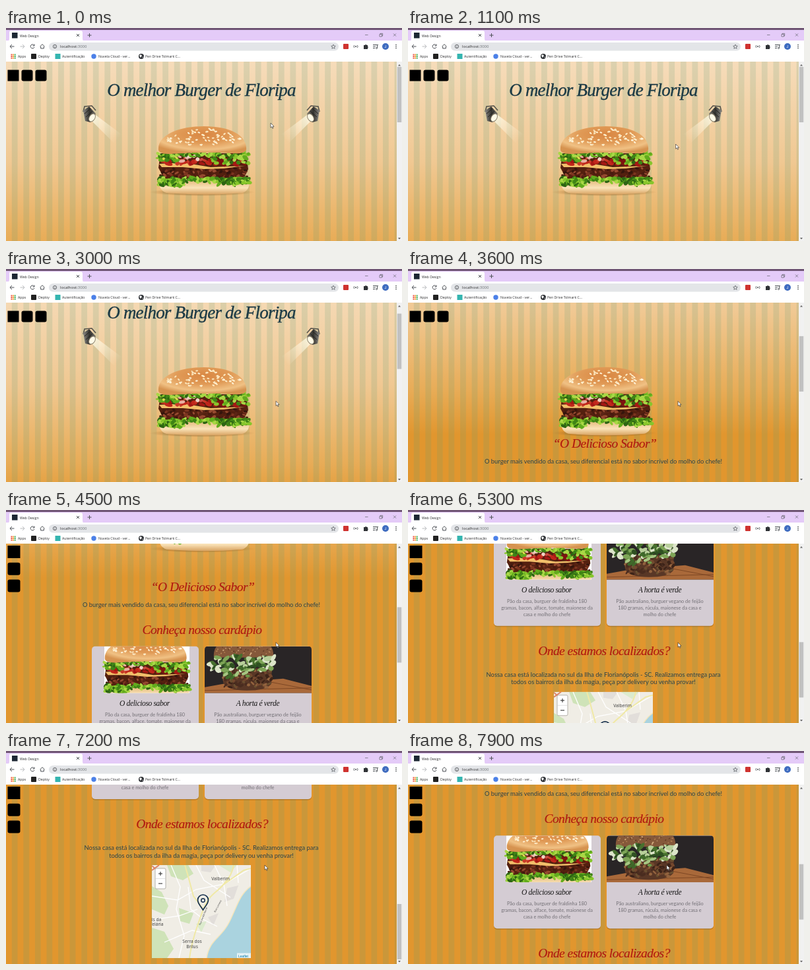
An HTML page for the animation above (8 s loop, 600 by 323 pixels).

```html
<!DOCTYPE html>
<html lang="pt-BR">
<head>
<meta charset="utf-8">
<title>Web Design</title>
<style>
html, body { margin: 0; width: 100%; height: 100%; overflow: hidden; background: #fff; }
svg { display: block; width: 100vw; height: 100vh; }
.ui { font: 5.2px "Open Sans", sans-serif; fill: #2c2c2e; }
.script { font-family: "Liberation Serif", serif; font-style: italic; letter-spacing: -.03em; text-anchor: middle; }
.title { font-size: 27px; fill: #1c3a45; stroke: #1c3a45; stroke-width: .35; }
.head { font-size: 19.6px; fill: #b01a12; stroke: #b01a12; stroke-width: .15; }
.name { font-size: 11.5px; fill: #161616; }
.copy { font: 9.4px Lato, sans-serif; fill: #29424a; text-anchor: middle; }
.desc { font: 7.35px Lato, sans-serif; fill: #737076; text-anchor: middle; }
.place { font: 6.6px "Noto Sans", sans-serif; fill: #444; text-anchor: middle; }
.line { fill: none; stroke: #4d5156; stroke-width: 1; }
</style>
</head>
<body>
<svg viewBox="0 0 600 323" preserveAspectRatio="none">
<defs>
  <clipPath id="view"><rect y="51" width="592" height="272"/></clipPath>
  <clipPath id="cardL"><path d="M130 565V499q0-5 5-5H287q5 0 5 5V565Z"/></clipPath>
  <clipPath id="cardR"><path d="M301 565V499q0-5 5-5H458q5 0 5 5V565Z"/></clipPath>
  <clipPath id="mapClip"><rect x="221" y="173" width="150" height="141"/></clipPath>
  <linearGradient id="sky" gradientUnits="userSpaceOnUse" x1="0" y1="51" x2="0" y2="390">
    <stop stop-color="#f6dcba"/><stop offset="1" stop-color="#e1962e"/>
    <stop offset="0" stop-color="#f6dcba"/>
  </linearGradient>
  <linearGradient id="dusk" gradientUnits="userSpaceOnUse" x1="0" y1="51" x2="0" y2="390">
    <stop stop-color="#f6dcba"/><stop offset=".45" stop-color="#f0c892"/><stop offset=".8" stop-color="#e8ac57"/><stop offset="1" stop-color="#e1962e"/>
  </linearGradient>
  <pattern id="stripes" width="17.57" height="10" patternUnits="userSpaceOnUse">
    <rect x="8.785" width="8.785" height="10" fill="#5a9678" opacity=".17"/>
  </pattern>
  <radialGradient id="bun" cx=".52" cy=".3" r=".68">
    <stop stop-color="#d98743"/><stop offset=".45" stop-color="#e09a56"/><stop offset=".8" stop-color="#f0c184"/><stop offset="1" stop-color="#d69350"/>
  </radialGradient>
  <linearGradient id="base" x2="0" y2="1">
    <stop stop-color="#e2b678"/><stop offset=".55" stop-color="#fae3b8"/><stop offset="1" stop-color="#d8a260"/>
  </linearGradient>
  <radialGradient id="shade">
    <stop stop-color="#5b3a14" stop-opacity=".65"/><stop offset=".7" stop-color="#8a5c26" stop-opacity=".35"/><stop offset="1" stop-color="#b07a38" stop-opacity="0"/>
  </radialGradient>
  <linearGradient id="beam" gradientUnits="userSpaceOnUse" x1="131" y1="136" x2="170" y2="168">
    <stop stop-color="#fffbe6" stop-opacity=".85"/><stop offset="1" stop-color="#fff4da" stop-opacity="0"/>
  </linearGradient>
  <linearGradient id="metal"><stop stop-color="#8a8884"/><stop offset=".5" stop-color="#33332f"/><stop offset="1" stop-color="#77746c"/></linearGradient>
  <g id="lamp">
    <path d="M129 140 136 132 176 162 164 175Z" fill="url(#beam)"/>
    <path d="M117 127 119 119 130 118 136 125" fill="none" stroke="#55534c" stroke-width="1.600"/>
    <path d="M117 125 126 119 136 130 128 143 120 141Z" fill="url(#metal)"/>
    <path d="M119 130 127 123M121 135 131 126" stroke="#24231f"/>
    <ellipse cx="130.500" cy="136" rx="4.200" ry="6.500" transform="rotate(32 130.500 136)" fill="#fffbe8" stroke="#8d8470"/>
  </g>
  <g id="burger"></g>
</defs>

<g clip-path="url(#view)">
  <g id="page">
    <rect y="51" width="592" height="840" fill="url(#dusk)"/>
    <rect y="51" width="592" height="840" fill="url(#stripes)"/>
    <text class="script title" x="296" y="103">O melhor Burger de Floripa</text>
    <use href="#lamp"/><use href="#lamp" transform="matrix(-1 0 0 1 592 0)"/>
  </g>
  <use id="hero" href="#burger"/>
  <g id="content">
    <text class="script head" x="298" y="410">“O Delicioso Sabor”</text>
    <text class="copy" x="296" y="434">O burger mais vendido da casa, seu diferencial está no sabor incrível do molho do chefe!</text>
    <text class="script head" x="297" y="475">Conheça nosso cardápio</text>
    <g fill="#7a4a10" opacity=".35"><rect x="130" y="495.500" width="162" height="141" rx="5"/><rect x="301" y="495.500" width="162" height="141" rx="5"/></g>
    <g fill="#d4ccd3"><rect x="130" y="494" width="162" height="141" rx="5"/><rect x="301" y="494" width="162" height="141" rx="5"/></g>
    <g clip-path="url(#cardL)">
      <rect x="149" y="494" width="129" height="71" fill="#fff"/>
      <use href="#burger" transform="translate(-65 341.200) scale(.93)"/>
    </g>
    <g clip-path="url(#cardR)">
      <rect x="301" y="494" width="162" height="71" fill="#292526"/>
      <path d="M301 556 340 549 420 543 463 554V565H301Z" fill="#a9693a"/>
      <path d="M301 561 463 557M400 548 463 560" stroke="#7d4724"/>
      <g id="vegan"></g>
    </g>
    <text class="script name" x="210" y="584">O delicioso sabor</text>
    <text class="script name" x="381.500" y="584">A horta é verde</text>
    <g class="desc">
      <text x="210.500" y="600">Pão da casa, burguer de fraldinha 180</text>
      <text x="210.500" y="610">gramas, bacon, alface, tomate, maionese da</text>
      <text x="210.500" y="620">casa e molho do chefe</text>
      <text x="381.500" y="600">Pão australiano, burguer vegano de feijão</text>
      <text x="381.500" y="610">180 gramas, rúcula, maionese da casa e</text>
      <text x="381.500" y="620">molho do chefe</text>
    </g>
    <text class="script head" x="297" y="679">Onde estamos localizados?</text>
    <text class="copy" x="296" y="712">Nossa casa está localizada no sul da Ilha de Florianópolis - SC. Realizamos entrega para</text>
    <text class="copy" x="296" y="723.500">todos os bairros da ilha da magia, peça por delivery ou venha provar!</text>
    <g transform="translate(0 562)" clip-path="url(#mapClip)">
      <rect x="221" y="173" width="150" height="141" fill="#f0ede5"/>
      <g fill="#cfe3b8">
        <path d="M221 205 236 214 246 235 240 248 221 240ZM244 173H276L284 186 268 196 250 190ZM221 268 240 274 254 300 244 314H221ZM262 238 284 246 278 262 264 258Z"/>
        <path d="M322 173H350L340 184ZM288 262 304 258 296 275Z" fill="#dcebcd"/>
      </g>
      <path d="M296 173H318L310 184 296 182ZM335 208 352 204 345 224 331 229ZM306 252 322 246 314 265Z" fill="#e2deda"/>
      <path fill="none" stroke="#fff" stroke-width="1.300" d="M221 220 260 226 288 210 330 202 371 178M250 173 264 206 258 240 270 280 262 314M288 173 300 196 340 222M316 173 330 202 335 235M221 256 262 250 290 240M240 290 282 272 310 278M276 206 280 240 300 256 320 266M350 173 352 200"/>
      <path d="M371 205C354 217 350 236 338 260S308 286 304 314H371Z" fill="#aad3df"/>
      <path d="M371 205C354 217 350 236 338 260S308 286 304 314" fill="none" stroke="#f4e6bd" stroke-width="1.500"/>
      <path d="M278 314C282 285 291 262 299 240S318 216 329 203 343 184 345 173M299 240 284 220 276 190 271 173M329 203 360 181 371 178" fill="none" stroke="#f0e9a6" stroke-width="2"/>
      <path d="M221 181 232 173M221 174 229 181" stroke="#dc8468" stroke-width="2"/>
      <g class="place">
        <text x="325" y="196">Valberim</text><text x="282" y="291">Serra dos</text><text x="282" y="298.500">Brilus</text>
        <text x="228" y="258">is da</text><text x="228" y="265">Velária</text>
        <text font-size="3.600" transform="translate(300 251) rotate(-68)">Rua Verdal Norte</text>
        <text font-size="3.600" transform="translate(322 236) rotate(-62)">Rua Lumera</text>
      </g>
      <rect x="226" y="178" width="16" height="31" rx="2" fill="#fff" stroke="#b4b1aa"/>
      <path d="M226 193.500H242" stroke="#ccc" stroke-width=".6"/>
      <path d="M231 186H237M234 183V189M231 201H237" stroke="#222"/>
      <path d="M298.500 241C294 234 290.500 231 290.500 226A8 8 0 0 1 306.500 226C306.500 231 303 234 298.500 241Z" fill="none" stroke="#16304d" stroke-width="1.700"/>
      <circle cx="298.500" cy="226.500" r="2.700" fill="none" stroke="#16304d" stroke-width="1.500"/>
      <rect x="350" y="306.500" width="21" height="8" fill="#fff" opacity=".7"/>
      <text x="352" y="312.500" font-size="5" font-family="Liberation Sans, sans-serif" fill="#0078a8">Leaflet</text>
    </g>
  </g>
  <g id="icons"><rect/><rect/><rect/></g>
</g>

<rect width="600" height="20" fill="#e4cbf8"/>
<rect width="600" height="3" fill="#705675"/>
<path d="M2 20Q5 20 5 16V7Q5 4 8 4H113Q116 4 116 7V16Q116 20 119 20Z" fill="#fff"/>
<rect y="19" width="600" height="32" fill="#fff"/>
<rect x="9" y="7" width="8.500" height="8.500" fill="#1c2733"/>
<g class="ui">
  <text x="21" y="13.500">Web Design</text>
  <text x="18" y="45">Apps</text><text x="49" y="45">Deploy</text><text x="85" y="45">Autentificação</text>
  <text x="140" y="45">Nuvela Cloud - ver...</text><text x="211" y="45">Pen Drive Tolmark C...</text>
</g>
<path class="line" d="M107 9 111 13M111 9 107 13M123.500 11H129.500M126.500 8V14" stroke-width=".8"/>
<path class="line" d="M544 10.500H548.500M566 9.500H569.500V13H566ZM567 9.500V8.300H570.700V12H569.500M587 8.500 591 12.500M591 8.500 587 12.500" style="stroke-width:.6"/>
<rect x="65" y="22" width="439" height="12.500" rx="6.200" fill="#e3e5e8"/>
<g class="line">
  <path d="M12.500 28H6.500M9 25 6 28 9 31"/>
  <path d="M21.500 28H27.500M25 25 28 28 25 31" stroke="#b8babd"/>
  <path d="M42.500 26A3 3 0 1 0 43 29M43 24.500V27H40.500M51.500 28 55 24.700 58.500 28M52.700 28V31H57.300V28"/>
  <circle cx="74" cy="28" r="2.700" stroke-width=".8"/><path d="M74 27.500V30M74 26V26.600" stroke-width=".7"/>
  <path d="M496 25 497 27.200 499.300 27.400 497.500 28.900 498.100 31.200 496 30 493.900 31.200 494.500 28.900 492.700 27.400 495 27.200Z" stroke-width=".7"/>
  <path d="M527.700 26Q526 28 527.700 30M532.300 26Q534 28 532.300 30" stroke-width=".8"/><circle cx="530" cy="28" r=".8"/>
  <path d="M556 25.500H562M556 28H560M556 30.500H559M562.500 30.500V25.500H564"/><circle cx="561.500" cy="30.500" r="1"/>
</g>
<path d="M542 26H544A1.300 1.300 0 0 1 546.500 26H548V28A1.300 1.300 0 0 1 548 30.300V32H542Z" fill="#2f3236"/>
<rect x="511" y="24" width="8" height="8" rx="1" fill="#cf3330"/>
<circle cx="575" cy="28" r="5" fill="#3f6cc0"/>
<text x="575" y="29.800" text-anchor="middle" font-size="5" font-family="Roboto, sans-serif" fill="#fff">J</text>
<g fill="#2f3236"><circle cx="591" cy="25.500" r=".8"/><circle cx="591" cy="28" r=".8"/><circle cx="591" cy="30.500" r=".8"/></g>
<text class="ui" x="82" y="30.300" style="font-size:6px">localhost:<tspan fill="#707478">3000</tspan></text>
<g id="apps"></g>
<rect x="38" y="39" width="8" height="8" rx="1" fill="#222"/>
<rect x="74.500" y="39" width="8" height="8" fill="#35b5b0"/>
<circle cx="133" cy="43" r="3.700" fill="#4b80e8"/>
<circle cx="205" cy="43" r="4" fill="#2f3236"/><path d="M202 42 204 40 206 42 204 45ZM207 44 208.500 43 207 46Z" fill="#fff"/>
<rect x="592" y="51" width="8" height="272" fill="#f1f1f1"/>
<path d="M594 57.500 596 55 598 57.500ZM594 318 596 320.500 598 318Z" fill="#666"/>
<rect id="thumb" x="592.800" width="6.400" height="84" fill="#c1c1c1"/>
<path id="arrow" d="M0 0V7.200L1.700 5.700 2.900 8.300 4 7.800 2.900 5.300H5.100Z" fill="#fff" stroke="#222" stroke-width=".6"/>
<path id="hand" d="M0 0Q1-.8 1.600.2V3L4.700 3.700Q5.300 4 5.200 5L4.600 8H.8L-1.500 4.900Q-1.200 4 0 4.800Z" fill="#fff" stroke="#222" stroke-width=".6"/>
</svg>

<script>
const $ = id => document.getElementById(id);
let seed = 7;
const rand = () => (seed = seed * 16807 % 2147483647) / 2147483647;
const between = (a, b) => a + (b - a) * rand();
const pick = list => list[Math.floor(rand() * list.length)];
const dot = (x, y, rx, ry, fill, turn = 0) =>
  `<ellipse rx="${rx.toFixed(1)}" ry="${ry.toFixed(1)}" fill="${fill}" transform="translate(${x.toFixed(1)} ${y.toFixed(1)}) rotate(${turn.toFixed(0)})"/>`;

// Scatters small tilted ellipses over a rectangle.
function scatter(count, [x0, x1], [y0, y1], size, colors) {
  let out = '';
  for (let i = 0; i < count; i++) {
    const x = x0 + (x1 - x0) * (i + rand()) / count;
    out += dot(x, between(y0, y1), size * between(.7, 1.4), size * between(.4, .8), pick(colors), between(-60, 60));
  }
  return out;
}

function seeds() {
  let out = '';
  for (let i = 0; i < 75; i++) {
    const u = between(-.85, .85), top = 150 + 33 * (1 - Math.sqrt(1 - u * u));
    const y = between(top + 2, 178 - 8 * u * u);
    out += dot(300 + u * 65, y, 2, 1.1, pick(['#fff3d8', '#fae3b8', '#ffedc8']), between(-50, 50));
  }
  return out;
}

const greens = ['#3f8416', '#62ab1d', '#87c62c', '#a9d846', '#2d6413'];
const browns = ['#35150d', '#5c2516', '#7d3520', '#481b10', '#964a30'];

$('burger').innerHTML =
  dot(297, 249, 80, 6, 'url(#shade)') +
  '<path d="M232 230H369Q370 246 358 250Q300 255 243 250Q231 246 232 230Z" fill="url(#base)"/>' +
  '<path d="M234 190H364L367 214 360 229H240L231 212Z" fill="#54200f"/>' +
  scatter(100, [234, 365], [212, 228], 3, browns) +
  '<path d="M232 206 268 204 310 211 362 209 330 213 300 214 268 211 236 211Z" fill="#f2bf6a"/>' +
  scatter(30, [236, 362], [200, 207], 4.5, ['#a51814', '#c0261b', '#7e1310', '#c93a28']) +
  scatter(9, [262, 296], [194, 202], 3.8, ['#e8b0a2', '#c84c42', '#f0d3c6']) +
  scatter(50, [231, 369], [189, 195], 3.6, greens) +
  scatter(26, [312, 368], [193, 206], 4, greens) +
  scatter(16, [231, 260], [193, 202], 4, [...greens, '#d8dc4e']) +
  scatter(60, [231, 369], [227, 234], 4, greens) +
  scatter(40, [231, 270], [230, 239], 4, greens) +
  scatter(34, [322, 369], [229, 238], 4, greens) +
  '<path d="M231 185C229 164 258 149 300 149S366 164 364 185Q362 191 346 190Q300 187 250 191Q232 191 231 185Z" fill="url(#bun)"/>' +
  seeds();

$('vegan').innerHTML =
  '<path d="M315 511Q313 493 330 486H392Q407 494 405 511Z" fill="#85583a"/>' +
  scatter(45, [318, 402], [493, 507], 1.2, ['#d5ad80', '#b98858', '#5f3a24']) +
  '<path d="M328 527H403L402 551Q394 561 365 561 335 561 329 549Z" fill="#593726"/>' +
  scatter(100, [330, 402], [530, 556], 3, ['#3c2318', '#74482d', '#93633e', '#4a2c1f', '#6a5030']) +
  scatter(75, [309, 406], [509, 530], 5, ['#47702e', '#7ea557', '#b8cf9a', '#2f5122', '#dce5c9']) +
  scatter(14, [330, 372], [526, 541], 4, ['#6c9848', '#a6c682', '#3f692a']);

let grid = '';
for (let i = 0; i < 9; i++) {
  const color = ['#ea4335', '#f29b2d', '#34a853', '#4285f4'][(i + Math.floor(i / 3)) % 4];
  grid += `<rect x="${7.5 + i % 3 * 2.6}" y="${39.5 + Math.floor(i / 3) * 2.6}" width="1.9" height="1.9" fill="${color}"/>`;
}
$('apps').innerHTML = grid;

const LOOP = 8000, MAX_SCROLL = 562;
const scrollKeys = [[0, 0], [2850, 0], [3600, 139], [4500, 287], [5300, 459], [5800, 562], [7230, 562], [7900, 366], [8000, 345]];
const xKeys = [[0, 401], [300, 401], [1700, 409], [5800, 409], [6250, 302], [6700, 302], [7200, 392], [8000, 392]];
const yKeys = [[0, 144], [300, 144], [1700, 200], [5800, 201], [6250, 228], [6700, 228], [7200, 173], [8000, 173]];

function track(keys, t) {
  const i = Math.max(1, keys.findIndex(k => k[0] >= t));
  const [t0, a] = keys[i - 1], [t1, b] = keys[i];
  return a + (b - a) * (t - t0) / (t1 - t0);
}

const move = (id, x, y) => $(id).setAttribute('transform', `translate(${x.toFixed(2)} ${y.toFixed(2)})`);

function placeIcons(stacked) {
  [...$('icons').children].forEach((icon, i) => {
    const size = stacked ? 19 : 17;
    const box = { x: stacked ? 2.5 : 2.5 + 21 * i, y: stacked ? 54 + 25.8 * i : 63.5, width: size, height: size, rx: i ? 3 : 0 };
    for (const key in box) icon.setAttribute(key, box[key]);
  });
}

function draw(t) {
  const scroll = track(scrollKeys, t);
  move('page', 0, -scroll);
  move('content', 0, -scroll);
  // The hero stays pinned at first, then leaves faster than the page.
  move('hero', 0, -Math.max(0, scroll - 139) * 190 / 148);
  placeIcons(scroll > 180);
  $('thumb').setAttribute('y', 59 + 173 * scroll / MAX_SCROLL);

  const x = track(xKeys, t), y = track(yKeys, t);
  const top = 735 - scroll;
  const onMap = x > 221 && x < 371 && y > top && y < top + 141;
  move('arrow', x, y);
  move('hand', x, y);
  $('arrow').style.display = onMap ? 'none' : '';
  $('hand').style.display = onMap ? '' : 'none';
}

const start = performance.now();
function frame() {
  draw((performance.now() - start) % LOOP);
  requestAnimationFrame(frame);
}
frame();
</script>
</body>
</html>
```
